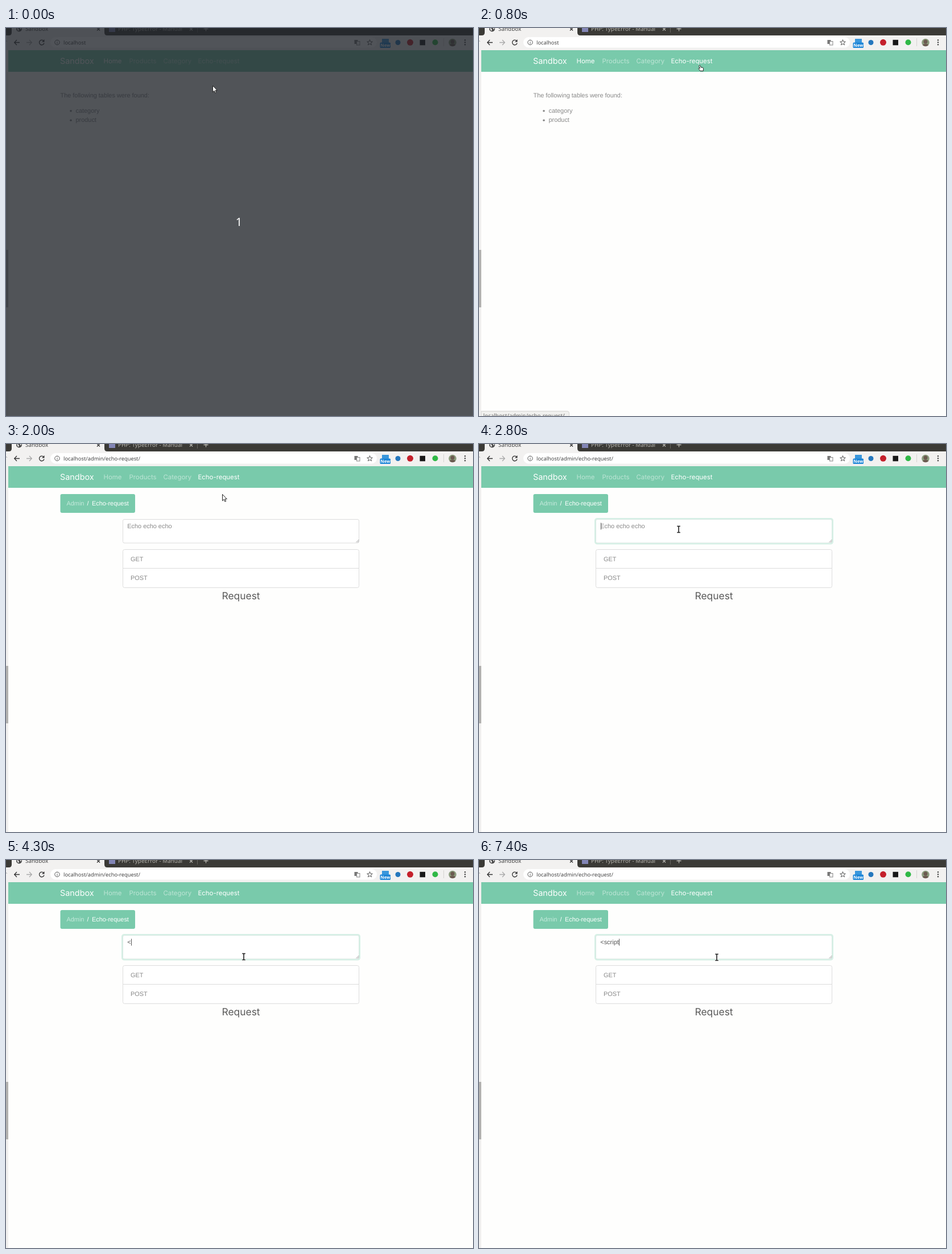
Recreate the animation shown at these times as an HTML page. Size 821 px wide and 682 px high, loop 8000 ms.

```html
<!DOCTYPE html>
<html lang="en">
<head>
<meta charset="utf-8">
<title>Echo request</title>
<style>
  html, body { margin: 0; width: 100%; height: 100%; overflow: hidden; background: #fefefd; }
  svg { display: block; width: 821px; height: 682px; }
  text { font: 10.92px "Liberation Sans", Arial, sans-serif; fill: #888; text-rendering: geometricPrecision; white-space: pre; }
  .ui { font: 9.9px "Noto Sans", sans-serif; fill: #444; }
  .url { font-size: 9.3px; }
  .nav { font: 11.4px Inter, sans-serif; fill: #fff; fill-opacity: .5; }
  .nav.on { fill-opacity: 1; }
  .brand { font: 14.4px Inter, sans-serif; fill: #fff; }
  .title { font: 17.4px Inter, sans-serif; fill: #5a5a5a; text-anchor: middle; }
  .green { fill: #79caab; }
  .white { fill: #fff; }
  .line { fill: none; stroke: #333; stroke-width: 1.3; }
  .box { fill: #fff; stroke: #dcdcdc; }
</style>
</head>
<body>
<svg viewBox="0 0 821 682">
  <rect width="821" height="682" fill="#fefefd"/>

  <!-- Tab strip -->
  <rect width="821" height="13" fill="#3b3a36"/>
  <path d="M5 13Q10 13 10 8V0H173V8Q173 13 178 13Z" fill="#f2f1f0"/>
  <circle cx="23" cy="1.5" r="5" fill="#4a4a4a"/>
  <path d="M19 0L22 1 23 4 21 5ZM24-1L27 0 26 3Z" fill="#f2f1f0"/>
  <text class="ui" x="34" y="5">Sandbox</text>
  <path class="line" d="M160-.5L165 4.5M165-.5L160 4.5"/>
  <rect x="181" y="-4" width="11" height="11" fill="#8285b5"/>
  <text class="ui" x="197" y="5" style="fill:#b5b3ad">PHP: TypeError - Manual</text>
  <path class="line" d="M323-.5L328 4.5M328-.5L323 4.5M347.500 1.500H355.500M351.500 0V5.500" style="stroke:#b5b3ad"/>
  <path d="M336.500 0V8" stroke="#66645f"/>

  <!-- Toolbar -->
  <rect y="13" width="821" height="26" fill="#f2f1f0"/>
  <path d="M0 22L2 24" stroke="#aaa"/>
  <rect x="78" y="16" width="574" height="18.500" rx="9.250" fill="#fff"/>
  <path class="line" d="M24 25.500H15M19 21L14.700 25.500 19 30"/>
  <path class="line" d="M36 25.500H45M41 21L45.300 25.500 41 30" style="stroke:#aaa"/>
  <path class="line" d="M66 22.500A4.300 4.300 0 1 0 67 26.500"/>
  <path d="M67.500 20V24.500H63Z" fill="#333"/>
  <circle class="line" cx="90" cy="25.300" r="4.200" style="stroke:#555;stroke-width:1"/>
  <path d="M90 24.800V27.800M90 22.700V23.700" stroke="#555"/>
  <text class="ui url" id="url" x="101" y="28.500"></text>
  <rect x="612.500" y="21" width="6" height="7" fill="#777"/>
  <rect x="616.500" y="23.500" width="5.500" height="6.500" fill="#f4f4f4" stroke="#888"/>
  <path d="M639.500 20.500L640.800 24 644.300 24.100 641.500 26.300 642.500 29.800 639.500 27.800 636.500 29.800 637.500 26.300 634.700 24.100 638.200 24Z" fill="none" stroke="#555"/>
  <rect x="661" y="19" width="12" height="12" fill="#3a97dc"/>
  <rect x="657.500" y="25.500" width="18.500" height="9.500" rx="1.500" fill="#1d86d8"/>
  <text class="ui white" x="667" y="33.200" text-anchor="middle" style="font-size:7.500px;font-weight:700;fill:#fff">New</text>
  <circle cx="689" cy="25.500" r="4.500" fill="#2477bd"/>
  <circle cx="710.500" cy="25.300" r="5.500" fill="#c4202b"/>
  <rect x="727.500" y="20.800" width="9.500" height="9.500" fill="#181818"/>
  <circle id="badge" cx="754.500" cy="25.300" r="5" fill="#2fb846"/>
  <path d="M769.500 18V32" stroke="#d5d4d2"/>
  <clipPath id="round"><circle cx="785" cy="25.500" r="6.800"/></clipPath>
  <g clip-path="url(#round)">
    <rect x="778" y="18" width="14" height="15" fill="#8b9c7d"/>
    <circle cx="785" cy="24" r="3.500" fill="#6b5a50"/>
    <ellipse cx="785" cy="32" rx="5.500" ry="4.500" fill="#6b5a50"/>
  </g>
  <g fill="#444"><circle cx="807" cy="21.300" r="1.200"/><circle cx="807" cy="25.300" r="1.200"/><circle cx="807" cy="29.300" r="1.200"/></g>

  <!-- Neighbouring window edge -->
  <rect y="39" width="4" height="643" fill="#f1f0ef"/>
  <rect y="390" width="4" height="101" fill="#b3b2b0"/>

  <!-- Navigation -->
  <rect class="green" x="4" y="39" width="817" height="38"/>
  <text class="brand" x="95" y="63">Sandbox</text>
  <text class="nav" id="navHome" x="171.500" y="61.500">Home</text>
  <text class="nav" x="216.500" y="61.500">Products</text>
  <text class="nav" x="276.500" y="61.500">Category</text>
  <text class="nav" id="navEcho" x="337.500" y="61.500">Echo-request</text>

  <g id="homePage">
    <text x="95.500" y="121.700">The following tables were found:</text>
    <circle cx="114" cy="145.800" r="1.800" fill="#888"/>
    <text x="122.500" y="149">category</text>
    <circle cx="114" cy="162.200" r="1.800" fill="#888"/>
    <text x="122.500" y="165.400">product</text>
  </g>

  <g id="echoPage">
    <rect class="green" x="95.500" y="88" width="131.500" height="33" rx="3"/>
    <text x="106.500" y="108" style="fill:#c5e9dc">Admin</text>
    <text x="142.500" y="108" style="fill:#fff">/</text>
    <text x="151" y="108" style="fill:#fff">Echo-request</text>
    <rect class="box" x="205.500" y="132.500" width="415" height="41.500" rx="2.500"/>
    <rect id="glow" x="204.300" y="131.300" width="417.400" height="43.900" rx="3.500" fill="none" stroke="#d7f0e6" stroke-width="2.700"/>
    <path d="M615.500 173L620.500 168M618 173L620.500 170.500" stroke="#888" stroke-width=".8"/>
    <text id="field" x="213.300" y="148.300"></text>
    <rect id="caret" y="138.500" width="1" height="12" fill="#555"/>
    <rect class="box" x="205.500" y="185.500" width="415" height="67" rx="3"/>
    <path d="M205 218.500H621" stroke="#dcdcdc"/>
    <text x="219" y="205.500">GET</text>
    <text x="219" y="239">POST</text>
    <text class="title" x="413" y="273">Request</text>
  </g>

  <g id="status">
    <path d="M4 673.500H155Q158.500 673.500 158.500 677V683H4Z" fill="#f0f0ee" stroke="#d6d6d4"/>
    <text class="ui" x="7.500" y="685" style="fill:#666">localhost/admin/echo-request/</text>
  </g>

  <g id="countdown">
    <rect width="821" height="682" fill="#21252b" opacity=".78"/>
    <text class="ui" x="409.500" y="348" text-anchor="middle" style="font-size:20px;fill:#fff">1</text>
  </g>

  <g id="cursor">
    <path id="arrow" d="M.5 .5V11.800L3.200 9.300 4.900 13.300 6.700 12.500 5 8.700H8.300Z" fill="#fff" stroke="#222"/>
    <path id="hand" d="M1.500 .5Q.3 1 .8 2.200L2.500 6 .5 5.500Q-.8 6.300 .5 7.300L3 10.500H8.300V5.500Q8 4 6 4.300L4 4 2.800 1Q2.300 .2 1.500 .5Z" fill="#fff" stroke="#222"/>
    <g id="beam" fill="none">
      <path d="M-3-5.500H3M-3 5.500H3M0-5V5" stroke="#fff" stroke-width="3.500"/>
      <path d="M-2.800-5.500H2.800M-2.800 5.500H2.800M0-5V5" stroke="#222" stroke-width="1.600"/>
    </g>
  </g>
</svg>
<script>
const LOOP = 8000, PAGE_LOADED = 1600;
const el = id => document.getElementById(id);
const show = (id, on) => el(id).style.display = on ? '' : 'none';
const clamp = v => Math.max(0, Math.min(1, v));
const within = (t, from, to) => t >= from && t < to;

// Pointer moves: start, end, from, to
const moves = [
  [0, 100, [363, 101], [359, 98]],
  [200, 1100, [359, 98], [396, 54]],
  [1800, 2300, [396, 54], [351, 150]],
  [2900, 3300, [351, 150], [418, 170]],
  [6100, 6200, [418, 170], [418, 171]]
];
const keyTimes = [4300, 4700, 5100, 6000, 6200, 7200, 7400];
const caretOff = [[0, 2500], [3300, 3900], [5800, 6000], [6800, 7200]];

function pointerAt(t) {
  const [start, end, from, to] = moves.filter(m => t >= m[0]).pop();
  const p = clamp((t - start) / (end - start));
  const eased = p * p * (3 - 2 * p);
  return from.map((v, i) => Math.round(v + (to[i] - v) * eased));
}

function draw(time) {
  const t = Math.floor(time % LOOP / 100) * 100;
  const loaded = t >= PAGE_LOADED;
  const [x, y] = pointerAt(t);
  const overLink = y < 66;
  const overField = loaded && y > 131;

  show('countdown', t < 100);
  show('homePage', !loaded);
  show('echoPage', loaded);
  show('status', overLink);
  el('navHome').classList.toggle('on', !loaded);
  el('navEcho').classList.toggle('on', loaded || overLink);
  el('url').textContent = loaded ? 'localhost/admin/echo-request/' : 'localhost';
  el('badge').setAttribute('fill', t === PAGE_LOADED ? '#aaa' : '#2fb846');

  el('cursor').setAttribute('transform', `translate(${x} ${y})`);
  show('arrow', !overLink && !overField);
  show('hand', overLink);
  show('beam', overField);

  const typed = '<script'.slice(0, keyTimes.filter(k => t >= k).length);
  const field = el('field');
  field.textContent = typed || 'Echo echo echo';
  field.style.fill = typed ? '#555' : '#888';
  el('glow').setAttribute('opacity', clamp((t - 2400) / 200));
  show('caret', !caretOff.some(([from, to]) => within(t, from, to)));
  const width = typed && loaded ? field.getComputedTextLength() : 0;
  el('caret').setAttribute('x', Math.round(213.7 + width));
}

const begin = performance.now();
function tick() {
  draw(performance.now() - begin);
  requestAnimationFrame(tick);
}
tick();
</script>
</body>
</html>
```
